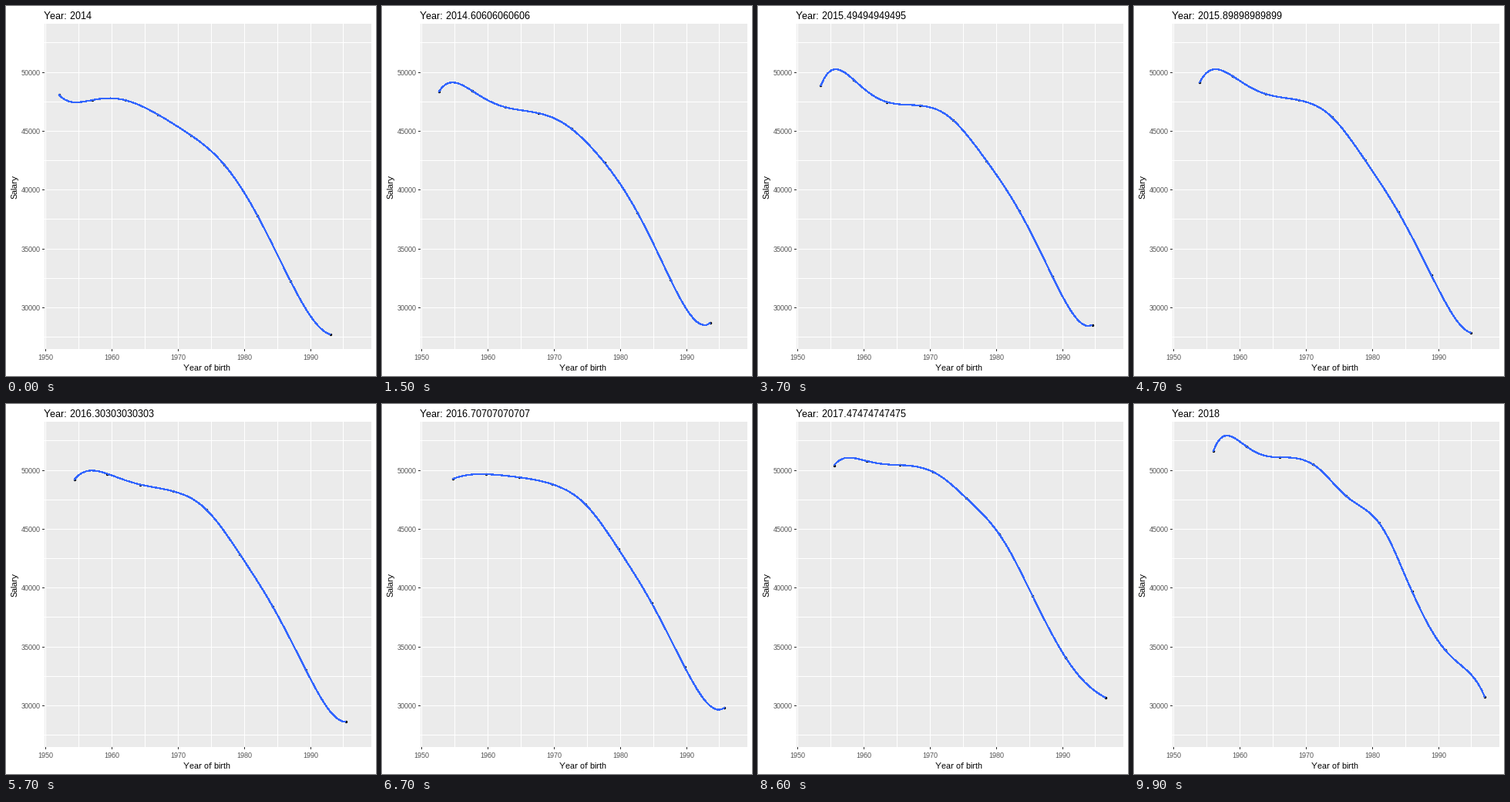
A matplotlib script for the animation above (10 s loop, 480 by 480 pixels).

```python
import numpy as np
import matplotlib.pyplot as plt
from matplotlib.animation import FuncAnimation
from matplotlib.patches import Rectangle

SIZE, DPI = 480, 100
FRAMES, INTERVAL = 100, 100
PX = 72 / DPI  # one pixel in points

plt.rcParams.update({
    "font.family": ["Liberation Sans", "DejaVu Sans"],
    "text.hinting": "native",
    "text.hinting_factor": 1,
})

LEFT, TOP, RIGHT, BOTTOM = 50, 23, 474, 445

# Salary in thousands by birth cohort, one row per survey from 2014 to 2018.
COHORT = np.append(np.arange(1952, 1988, 5), 1993)
SALARY = np.array([
    [48.10, 47.64, 47.64, 46.40, 44.63, 42.14, 37.82, 32.25, 27.73],
    [48.55, 48.97, 46.66, 46.63, 45.61, 42.47, 38.25, 32.47, 29.37],
    [49.20, 49.74, 48.30, 47.73, 46.25, 42.54, 38.13, 32.80, 27.73],
    [49.31, 49.65, 49.84, 49.25, 47.45, 43.62, 38.97, 33.49, 30.64],
    [51.64, 52.03, 51.11, 50.52, 47.84, 45.55, 39.72, 34.74, 30.74],
])
STEPS = len(SALARY) - 1
# Surveys fall on whole frames, so the steps between them differ by one.
KEY_FRAMES = [round(0.5 + (FRAMES - 1) * k / STEPS + 0.5) - 1
              for k in range(STEPS + 1)]
BIRTHS = np.linspace(COHORT[0], COHORT[-1], 80)


def x_px(year):
    return 51.43 + (year - 1950) * 8.59


def y_px(thousands):
    return 86.1 + (50 - thousands) * 15.27


def through(x, xs, ys):
    """Polynomial passing through every given point."""
    mid = xs.mean()
    return np.polyval(np.polyfit(xs - mid, ys, len(xs) - 1), x - mid)


def smooth(x, xs, ys):
    """Ease from a curve through the older cohorts to one through the younger."""
    t = np.clip((x - xs[3]) / (xs[6] - xs[3]), 0, 1)
    w = t * t * (3 - 2 * t)
    return (1 - w) * through(x, xs[:7], ys[:7]) + w * through(x, xs[3:], ys[3:])


fig = plt.figure(figsize=(SIZE / DPI, SIZE / DPI), dpi=DPI, facecolor="white")
ax = fig.add_axes([0, 0, 1, 1])
ax.set_xlim(0, SIZE)
ax.set_ylim(SIZE, 0)
ax.axis("off")


def box(x, y, w, h, color):
    ax.add_patch(Rectangle((x, y), w, h, fc=color, lw=0,
                           antialiased=False, zorder=1))


def label(x, y, text, size, color="black", **kw):
    kw = {"ha": "center", "va": "baseline", **kw}
    return ax.text(x, y, text, fontsize=size * PX, color=color, **kw)


box(LEFT, TOP, RIGHT - LEFT, BOTTOM - TOP, "#EBEBEB")

for year in range(1950, 2000, 5):
    x = int(x_px(year))
    box(x, TOP, 1, BOTTOM - TOP, "white")
    if year % 10 == 0:
        box(x, BOTTOM, 1, 3, "#333333")
        label(x + 0.5, 459, str(year), 9, "#4D4D4D")

for salary in range(27500, 55000, 2500):
    y = int(y_px(salary / 1000))
    box(LEFT, y, RIGHT - LEFT, 1, "white")
    if salary % 5000 == 0:
        box(LEFT - 3, y, 3, 1, "#333333")
        label(44.5, y + 4, str(salary), 9, "#4D4D4D", ha="right")

label(261, 473, "Year of birth", 11)
label(17, 234, "Salary", 11, rotation=90, ha="right", va="center")
title = label(49, 17, "", 13, ha="left")

dots, = ax.plot([], [], "o", color="black", ms=3.4 * PX, mew=0,
                antialiased=False, zorder=3)
trend, = ax.plot([], [], color="#3366FF", lw=1.2 * PX, antialiased=False,
                 solid_joinstyle="round", solid_capstyle="butt", zorder=4)


def update(i):
    phase = np.interp(i, KEY_FRAMES, range(STEPS + 1))
    k = min(int(phase), STEPS - 1)
    pay = SALARY[k] + (SALARY[k + 1] - SALARY[k]) * (phase - k)
    dots.set_data(x_px(COHORT + phase), y_px(pay))
    trend.set_data(x_px(BIRTHS + phase), y_px(smooth(BIRTHS, COHORT, pay)))
    title.set_text(f"Year: {2014 + STEPS * i / (FRAMES - 1):.15g}")
    return dots, trend, title


anim = FuncAnimation(fig, update, frames=FRAMES, interval=INTERVAL,
                     repeat=True, repeat_delay=0, blit=False)
plt.show()
```
